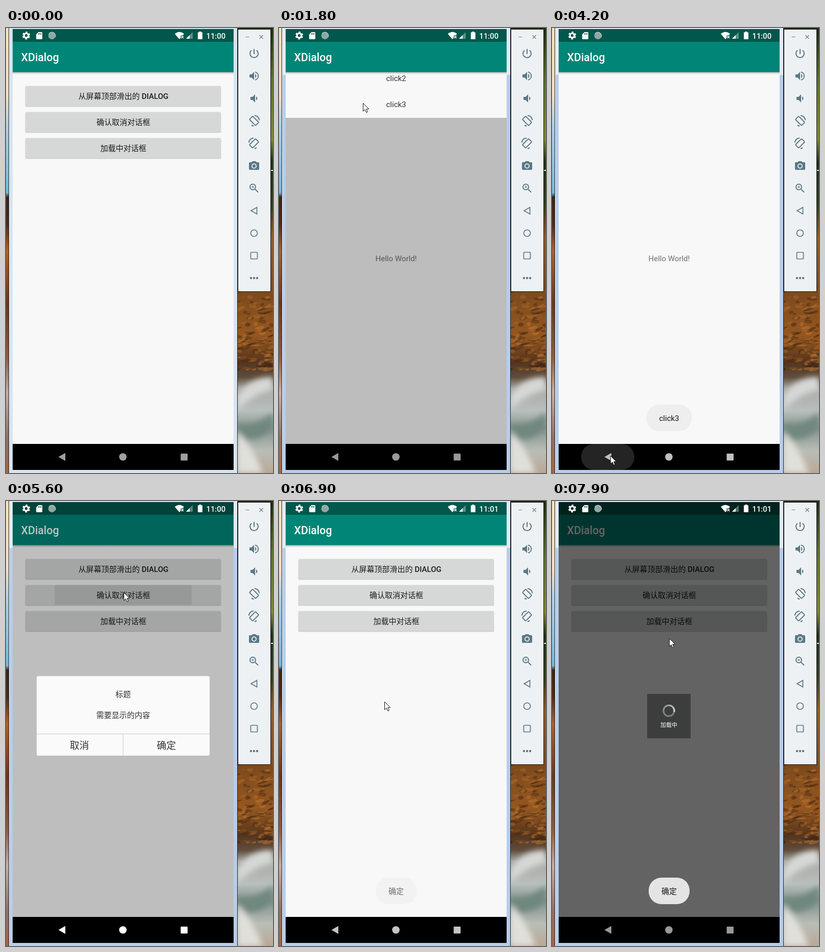
An HTML page for the animation above (8000 ms loop, 522x872 px).

```html
<!DOCTYPE html>
<html lang="zh">
<head>
<meta charset="utf-8">
<title>XDialog</title>
<style>
html, body { margin: 0; width: 100%; height: 100%; overflow: hidden; background: #d7e4f2; }
svg { display: block; width: 522px; height: 872px; }
text { font: 15px Roboto, "Noto Sans CJK SC", "Noto Sans CJK", sans-serif; }
.mid { text-anchor: middle; }
.med { font-weight: 500; }
.big { font-size: 18.8px; }
.small { font-size: 11px; }
.line { fill: none; stroke: #5b7886; stroke-width: 2; }
.fill { fill: #5b7886; }
</style>
</head>
<body>
<svg viewBox="0 0 522 872">
  <defs>
    <linearGradient id="left" x2="0" y2="1">
      <stop offset="0" stop-color="#f7dfb4"/><stop offset=".15" stop-color="#f3dcc0"/>
      <stop offset=".22" stop-color="#a9cfe4"/><stop offset=".37" stop-color="#74b6dc"/>
      <stop offset=".38" stop-color="#3a2413"/><stop offset=".44" stop-color="#4d2a14"/>
      <stop offset=".5" stop-color="#a8602c"/><stop offset=".62" stop-color="#6b3517"/>
      <stop offset=".74" stop-color="#8d5a3c"/><stop offset=".82" stop-color="#c3aca4"/>
      <stop offset=".92" stop-color="#8f6f66"/><stop offset="1" stop-color="#a5633f"/>
    </linearGradient>
    <linearGradient id="right" x2="0" y2="1">
      <stop offset="0" stop-color="#1d2a12"/><stop offset=".12" stop-color="#5d7426"/>
      <stop offset=".25" stop-color="#7c8a2d"/><stop offset=".3" stop-color="#20301a"/>
      <stop offset=".4" stop-color="#33401f"/><stop offset=".47" stop-color="#9a5a20"/>
      <stop offset=".6" stop-color="#7d4a1e"/><stop offset=".69" stop-color="#96571f"/>
      <stop offset=".75" stop-color="#55341c"/><stop offset=".785" stop-color="#5f4d3c"/>
      <stop offset=".81" stop-color="#a9a9a3"/><stop offset=".86" stop-color="#b9bfbd"/>
      <stop offset=".9" stop-color="#84948c"/><stop offset=".95" stop-color="#b9bdb6"/>
      <stop offset="1" stop-color="#b9a896"/>
    </linearGradient>
    <linearGradient id="shade" x2="0" y2="1">
      <stop offset="0" stop-color="#000" stop-opacity=".28"/><stop offset="1" stop-color="#000" stop-opacity="0"/>
    </linearGradient>
    <filter id="soft"><feGaussianBlur stdDeviation="6"/></filter>
    <clipPath id="screen"><rect x="13" y="86" width="432" height="729"/></clipPath>
  </defs>

  <rect width="6" height="872" fill="url(#left)"/>
  <rect x="452" width="70" height="872" fill="url(#right)"/>
  <g id="rocks"></g>
  <g filter="url(#soft)">
    <path d="M452 722q25-40 70-38v26q-40 6-70 40z" fill="#d5d8d6"/>
    <path d="M452 775q36 8 70-22v30q-30 32-70 20z" fill="#70877f"/>
    <path d="M452 790q30 30 50 82h-50z" fill="#e0e0da"/>
  </g>
  <rect x="518" y="278" width="4" height="2" fill="#e6e8e0"/>

  <rect x="5" width="448" height="872" fill="#222"/>
  <rect x="6" width="446" height="872" fill="#f2f6fb"/>
  <rect id="frame" x="7" width="445" height="872"/>
  <rect id="cap" x="7" width="445" height="92" fill="#e2ebf7"/>

  <rect x="13" y="2" width="432" height="864" fill="#f8f8f8"/>
  <g id="home"></g>
  <text id="hello" class="mid" x="229" y="457" fill="#6f6f6f">Hello World!</text>
  <g clip-path="url(#screen)">
    <rect id="veil" x="13" y="86" width="432" height="729"/>
    <g id="panel">
      <rect x="13" y="86" width="432" height="154" fill="#f8f8f8"/>
    </g>
  </g>
  <rect x="13" y="86" width="432" height="5" fill="url(#shade)"/>
  <rect x="13" y="2" width="432" height="25" fill="#00574b"/>
  <rect x="13" y="27" width="432" height="59.500" fill="#008577"/>
  <text class="med" x="29.500" y="65" fill="#fff" style="font-size:21.300px">XDialog</text>
  <rect id="dim" x="13" y="2" width="432" height="813"/>

  <g fill="#fff">
    <g fill="none" stroke="#fff">
      <circle cx="39.500" cy="14.800" r="4.300" stroke-width="3.200"/>
      <circle cx="39.500" cy="14.800" r="6.500" stroke-width="2.400" stroke-dasharray="3.500 3.307" transform="rotate(14 39.500 14.800)"/>
    </g>
    <path d="M63.500 8H69.500a1.500 1.500 0 0 1 1.500 1.500V20.500a1.500 1.500 0 0 1-1.500 1.500H60.500a1.500 1.500 0 0 1-1.500-1.500V12.500z"/>
    <path d="M63.500 10v3M66 10v3M68.500 10v3" stroke="#00574b" stroke-width="1.300"/>
    <circle cx="89.800" cy="15" r="7.200" fill="#8fa8a3"/>
    <path d="M84 11a7.200 7.200 0 0 1 12.500 6.500" fill="none" stroke="#c3d0cd" stroke-width="1.200"/>
    <path d="M330 11.500q9-7.500 18 0l-2.500 3h-4v4.500l-2.500 3z"/>
    <path d="M342.500 15.500l4.500 4.500m0-4.500l-4.500 4.500" stroke="#fff" stroke-width="1.500"/>
    <path d="M365 8v13h-13z" opacity=".35"/>
    <path d="M359 14v7h-7z"/>
    <path d="M377.500 8.500v-1.500h4v1.500h2.500v13.500h-9v-13.500z"/>
    <text id="clock" class="med" x="391.500" y="20.500" style="font-size:14.800px"></text>
  </g>

  <g id="confirm">
    <rect x="60" y="343" width="338" height="156" rx="3" fill="#fafafa"/>
    <path d="M60 456.500h338M229 457v42" stroke="#c8c8c8"/>
    <g class="mid" fill="#333">
      <text class="mid" x="229" y="383.500">标题</text>
      <text class="mid" x="229" y="425">需要显示的内容</text>
      <text class="mid big" x="143.500" y="485.500">取消</text>
      <text class="mid big" x="313.500" y="485.500">确定</text>
    </g>
  </g>
  <g id="loading">
    <rect x="186" y="378" width="85" height="87" fill="#3c3e3d"/>
    <g id="spin"></g>
    <text class="mid small" x="228.500" y="442.500" fill="#fff">加载中</text>
  </g>
  <g id="toast">
    <rect id="pill" y="738" height="52" rx="25" fill="#eee" opacity=".93"/>
    <text id="note" class="mid" x="229" y="770" fill="#111"></text>
  </g>

  <rect x="13" y="815" width="432" height="51"/>
  <rect id="press" x="57" y="815" width="104" height="51" rx="25" fill="#242424"/>
  <g id="nav">
    <path d="M102.500 840.500l13.500-7.700v15.400z"/>
    <circle cx="228.500" cy="840.500" r="7.300"/>
    <rect x="341.500" y="834" width="13.500" height="13.500" rx="1"/>
  </g>

  <rect x="453.500" y="2.500" width="64" height="514" fill="#eef1f4" stroke="#111"/>
  <path d="M468.500 17.500h7M495.500 14l7 7m0-7l-7 7" class="line" style="stroke:#777;stroke-width:1.200"/>
  <g id="tools"></g>

  <path id="cursor" d="M.5.500v15.500l3.600-3.300 2.700 5.800 2.500-1.100-2.600-5.600h5z" fill="#fff" stroke="#111"/>
</svg>
<script>
const LOOP = 8000, STEP = 100;
const $ = id => document.getElementById(id);
const set = (id, attrs) => { for (const k in attrs) $(id).setAttribute(k, attrs[k]); };
const fade = (id, v) => set(id, { opacity: v });

// Piecewise-linear track: each key is [time, ...values].
function track(t, keys) {
  if (t <= keys[0][0]) return keys[0].slice(1);
  for (let i = 1; i < keys.length; i++) {
    const a = keys[i - 1], b = keys[i];
    if (t <= b[0]) {
      const p = (t - a[0]) / (b[0] - a[0]);
      return a.slice(1).map((v, j) => v + (b[j + 1] - v) * p);
    }
  }
  return keys[keys.length - 1].slice(1);
}
const value = (t, ...keys) => track(t, keys)[0];

// Rocky texture beneath the tool bar
let seed = 7;
const rnd = () => (seed = seed * 16807 % 2147483647) / 2147483647;
const tones = ['#4a2a12', '#b06d2a', '#38200f', '#8f5520', '#c07c38'];
let rocks = '';
for (let i = 0; i < 130; i++) {
  const x = 452 + rnd() * 70, y = 515 + rnd() * 155;
  rocks += `<ellipse cx="${x}" cy="${y}" rx="${3 + rnd() * 8}" ry="${1 + rnd() * 3}" fill="${tones[i % 5]}" opacity=".45" transform="rotate(${rnd() * 50 - 35} ${x} ${y})"/>`;
}
$('rocks').innerHTML = rocks;

const labels = ['从屏幕顶部滑出的 <tspan class="med">DIALOG</tspan>', '确认取消对话框', '加载中对话框'];
$('home').innerHTML = labels.map((s, i) => {
  const y = 113.5 + i * 51;
  return `<rect x="37.500" y="${y + 1}" width="383" height="40" rx="2.500" opacity=".16"/>
    <rect x="38" y="${y}" width="382" height="39" rx="2" fill="#d6d7d7"/>
    <rect id="wave${i}" y="${y}" height="39" rx="2" opacity=".08"/>
    <text class="mid" x="229.500" y="${y + 25.5}" fill="#1b1b1b">${s}</text>`;
}).join('');

for (let i = 1; i < 4; i++)
  $('panel').innerHTML += `<text class="mid" x="229" y="${66 + i * 51}" fill="#333">click${i}</text>`;

// Ring whose brightness rises clockwise
const SEG = 24;
for (let i = 0; i < SEG; i++)
  $('spin').innerHTML += `<path d="M10.500 0A10.500 10.500 0 0 1 10.100 2.900" fill="none" stroke="#fff" stroke-width="3.200" opacity="${.32 + .6 * (i / SEG) ** 3}" transform="rotate(${i * 360 / SEG})"/>`;

const tag = (d, cls = 'line') => `<path class="${cls}" d="${d}"/>`;
const speaker = x => tag(`M${x} 9h4l5-5v16l-5-5h-4z`, 'fill');
const phone = '<rect class="line" x="7.500" y="3.500" width="9" height="17" rx="1.500" transform="rotate(-45 12 12)"/>' +
  tag('M13 1.500q8 1 9.500 9M11 22.500l-4-2');
const icons = [
  tag('M12 3v10M7 5.800a8 8 0 1 0 10 0'),
  speaker(3) + tag('M14 8q2.500 1.300 2.500 4t-2.500 4z', 'fill') + tag('M14 4.200a8 8 0 0 1 0 15.600'),
  speaker(5) + tag('M16 8q2.500 1.300 2.500 4t-2.500 4z', 'fill'),
  phone,
  `<g transform="matrix(-1 0 0 1 24 0)">${phone}</g>`,
  tag('M9 3 7.200 5H4a2 2 0 0 0-2 2v11a2 2 0 0 0 2 2h16a2 2 0 0 0 2-2V7a2 2 0 0 0-2-2h-3.200L15 3z', 'fill') +
    '<circle cx="12" cy="12.500" r="5" fill="#eef1f4"/><circle class="fill" cx="12" cy="12.500" r="3.200"/>',
  '<circle class="line" cx="9.500" cy="9.500" r="5.500"/>' + tag('M14 14l6 6') +
    '<path class="line" style="stroke-width:1.200" d="M7 9.500h5M9.500 7v5"/>',
  '<path class="line" style="stroke-width:1.700" d="M6 12l11.500-6.500v13z"/>',
  '<circle class="line" style="stroke-width:1.700" cx="12" cy="12" r="6.500"/>',
  '<rect class="line" style="stroke-width:1.700" x="5.500" y="5.500" width="13" height="13" rx="1"/>',
  [6, 12, 18].map(x => `<circle class="fill" cx="${x}" cy="12" r="2.200"/>`).join('')
];
$('tools').innerHTML = icons.map((s, i) =>
  `<g transform="translate(473 ${38 + i * 44})">${s}</g>`).join('');

function wave(i, t, start, end) {
  const half = t < start || t > end ? 0 : Math.min(191, 60 + (t - start) * .37);
  set('wave' + i, { x: 229 - half, width: half * 2 });
}

function draw(t) {
  const focus = t >= 200;
  set('frame', { fill: focus ? '#b7cdea' : '#d7e4f2' });
  fade('cap', focus ? 1 : 0);

  fade('home', value(t, [800, 1], [1000, .2], [1100, .025], [1600, 0], [4200, 0], [4600, 1]));
  fade('hello', value(t, [800, 0], [1100, 1], [4200, 1], [4500, 0]));
  wave(0, t, 700, 1000);
  wave(1, t, 5400, 5700);
  wave(2, t, 7400, 7700);

  const drop = value(t, [1500, 0], [2000, 1], [2600, 1], [2700, 0]);
  fade('veil', drop * .4);
  set('panel', { transform: `translate(0 ${-160 * (1 - drop)})` });

  fade('dim', value(t, [5400, 0], [5500, .06], [5600, .235], [5700, .6], [6500, .6], [6700, 0],
    [7500, 0], [7800, .55], [7900, .6]));
  fade('confirm', value(t, [5400, 0], [5600, 1], [6500, 1], [6700, 0]));
  fade('loading', value(t, [7500, 0], [7700, 1]));
  set('spin', { transform: `translate(228.500 411) rotate(${10 + (t - 7900) * .3})` });

  const late = t > 5000, wide = late ? 80 : 89;
  set('pill', { x: 229 - wide / 2, width: wide });
  $('note').textContent = late ? '确定' : 'click3';
  fade('toast', value(t, [2600, 0], [2700, .05], [3100, 1], [4600, 1], [4900, 0],
    [6700, 0], [6900, .6], [7100, 1]));
  $('clock').textContent = t < 6200 ? '11:00' : '11:01';

  fade('press', value(t, [4100, 0], [4200, 1], [4300, 1], [4700, 0]));
  const g = Math.round(value(t, [200, 160], [1000, 153], [4100, 153], [4200, 192], [4600, 255],
    [6600, 255], [6900, 196], [7200, 153]));
  set('nav', { fill: `rgb(${g},${g},${g})` });

  const [x, y] = track(t, [[200, 474, 160], [600, 215, 130], [800, 186, 125], [1600, 186, 125],
    [2400, 98, 213], [3200, 98, 213], [3700, 130, 780], [3900, 114, 838], [4300, 114, 838],
    [5000, 220, 187], [5100, 230, 179], [5800, 230, 179], [6300, 312, 470], [6600, 312, 470],
    [6900, 206, 393], [7300, 229, 236], [7400, 229, 236], [7600, 229, 269]]);
  set('cursor', { transform: `translate(${Math.round(x)} ${Math.round(y)})`, opacity: focus ? 1 : 0 });
}

const begin = performance.now();
function tick() {
  const t = (performance.now() - begin) % LOOP;
  draw(Math.floor(t / STEP) * STEP);
  requestAnimationFrame(tick);
}
tick();
</script>
</body>
</html>
```
